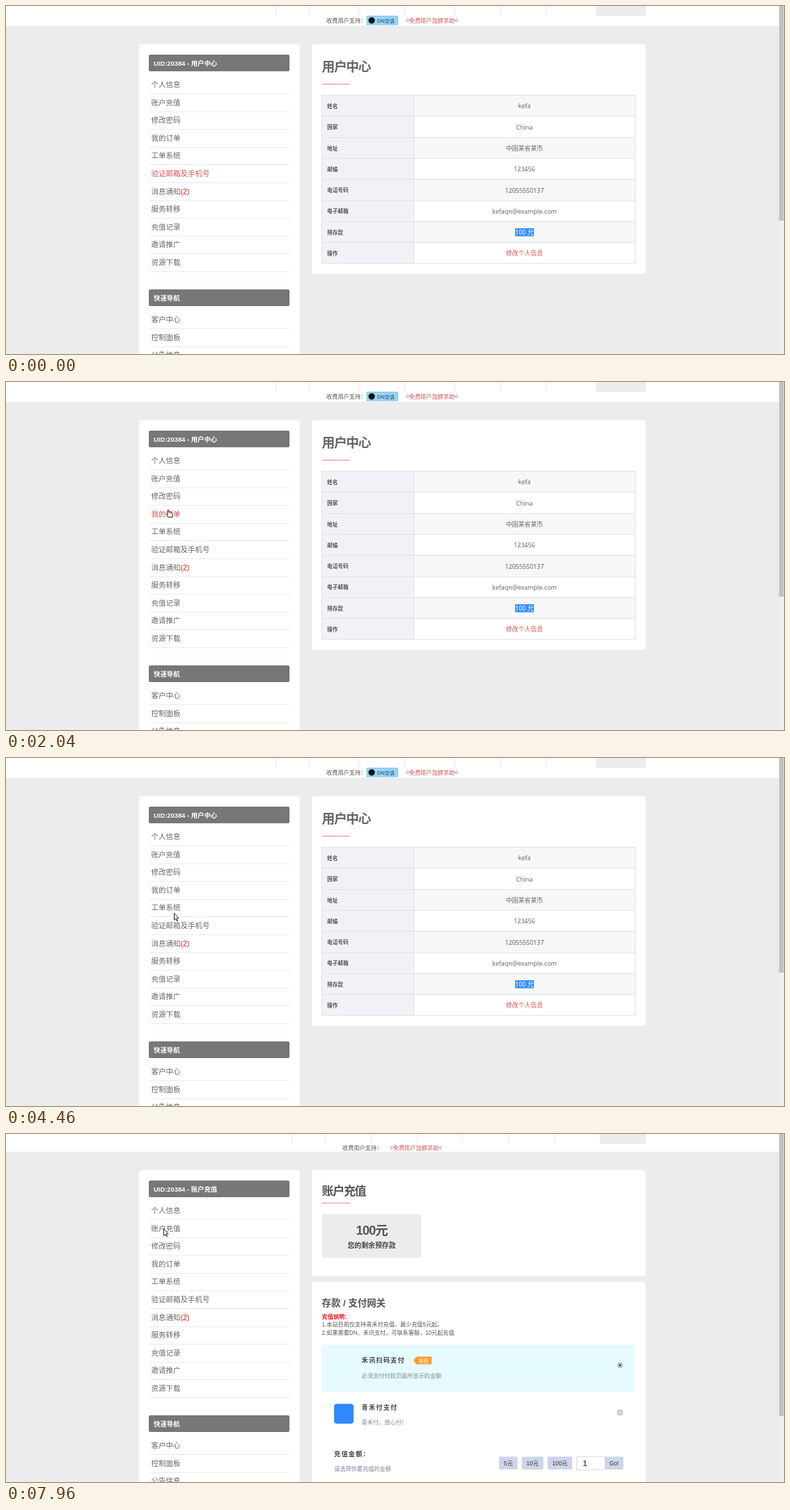
An HTML page with a canvas for the animation above (8 s loop, 1117x501 px).

```html
<!DOCTYPE html>
<html lang="zh-CN">
<head>
<meta charset="utf-8">
<title>用户中心</title>
<style>
html, body { margin: 0; width: 100%; height: 100%; overflow: hidden; background: #ececec; }
canvas { display: block; }
</style>
</head>
<body>
<canvas id="stage" width="1117" height="501"></canvas>
<script>
const ctx = document.getElementById('stage').getContext('2d');
const LOOP = 8000, SHOW = 50, CLICK = 6030, SWAP = 7960;
const ARIAL = '"Liberation Sans", "Noto Sans CJK SC", "Noto Sans CJK", sans-serif';
const HUMAN = '"Noto Sans", "Noto Sans CJK SC", "Noto Sans CJK", sans-serif';
const RED = '#d9534f', GREY = '#666', DARK = '#555', BG = '#ececec';

const MENU = ['个人信息', '账户充值', '修改密码', '我的订单', '工单系统', '验证邮箱及手机号',
  '消息通知', '服务转移', '充值记录', '邀请推广', '资源下载'];
const NAV = ['客户中心', '控制面板', '公告信息'];
const FIELDS = {
  姓名: 'kefa', 国家: 'China', 地址: '中国某省某市', 邮编: '123456',
  电话号码: '12055550137', 电子邮箱: 'kefaqn@example.com',
  预存款: '100 元', 操作: '修改个人信息'
};
const MENU_X = 208.5, MENU_Y = 113, STEP = 25.6, MENU_SIZE = 10.5;

// Pointer strokes: from, until, then the place reached
const START = [241, 240];
const STROKES = [
  [50, 250, 246, 277], [250, 740, 225, 203], [910, 1570, 232, 145], [1720, 2040, 233, 184],
  [2470, 2840, 570, 262], [2840, 3240, 250, 298], [3280, 4080, 242, 236],
  [4120, 4910, 239, 206], [4950, 5570, 224, 134], [5780, 6030, 226, 136]
];

function rect(x, y, w, h, color, r = 0) {
  ctx.fillStyle = color;
  ctx.beginPath();
  ctx.roundRect(x, y, w, h, r);
  ctx.fill();
}

function dot(x, y, r, color) {
  ctx.fillStyle = color;
  ctx.beginPath();
  ctx.arc(x, y, r, 0, Math.PI * 2);
  ctx.fill();
}

// Text placed by its vertical middle; returns its width
function text(str, x, mid, size, color = GREY, opt = {}) {
  ctx.font = `${opt.bold ? 'bold ' : ''}${size}px ${opt.font || ARIAL}`;
  ctx.letterSpacing = (opt.gap || 0) + 'px';
  ctx.textAlign = opt.align || 'left';
  ctx.fillStyle = color;
  ctx.fillText(str, x, mid + size * 0.38);
  return ctx.measureText(str).width;
}

function shape(points, fill, stroke) {
  ctx.beginPath();
  points.forEach(([x, y]) => ctx.lineTo(x, y));
  ctx.closePath();
  ctx.fillStyle = fill;
  ctx.fill();
  if (stroke) {
    ctx.strokeStyle = stroke;
    ctx.lineWidth = 0.9;
    ctx.stroke();
  }
}

function pointerAt(t) {
  let [x, y] = START;
  for (const [from, until, toX, toY] of STROKES) {
    const k = Math.min(1, Math.max(0, (t - from) / (until - from)));
    x += (toX - x) * k;
    y += (toY - y) * k;
  }
  return [x, y];
}

function hoveredRow(x, y) {
  return MENU.findIndex((s, i) => Math.abs(y - MENU_Y - i * STEP) < 6.5 &&
    x >= MENU_X && x <= MENU_X + s.length * MENU_SIZE);
}

function drawPointer(x, y, hand) {
  ctx.save();
  ctx.translate(Math.round(x), Math.round(y));
  ctx.lineJoin = 'round';
  const outline = hand
    ? [[-0.8, 0.5], [0.8, 0.5], [1.2, 3.6], [6, 4.8], [6, 10.6], [-0.2, 10.6], [-2.8, 6.2], [-0.8, 6.4]]
    : [[0.5, 0.5], [0.5, 10.3], [2.7, 8.3], [4.2, 11.8], [5.6, 11.2], [4.1, 7.8], [7, 7.6]];
  shape(outline, '#fff', '#111');
  ctx.restore();
}

// Tabs run leftwards from the right edge; the wide ones carry a caret
function drawHeader(bottom, wideTabs, badgeWidth) {
  rect(0, 0, 1110, bottom, '#fff');
  let x = 918.5;
  for (let i = 0; i < 8; i++) {
    const w = i === 7 ? 48 : 65.8 + (wideTabs.includes(i) ? 5.8 : 0);
    x -= w;
    if (i === 0) rect(x, 0, w, 14, BG);
    else rect(Math.round(x), 0, 1, 13, '#e6e6e6');
  }
  const half = (143 + badgeWidth) / 2, mid = bottom / 4 + 13.5;
  text('收费用户支持：', 554.5 - half, mid, 8.2, DARK);
  text('>免费用户加群求助<', 554.5 + half, mid, 8.2, RED, { align: 'right' });
}

function drawScrollbar(end) {
  rect(1110, 0, 7, 501, '#f1f1f1');
  rect(1110, 0, 6.5, end, '#c1c1c1');
}

function drawList(items, y, hover) {
  items.forEach((s, i) => {
    const mid = y + i * STEP;
    const w = text(s, MENU_X, mid, MENU_SIZE, i === hover ? RED : GREY);
    if (s === '消息通知') text('(2)', MENU_X + w, mid, MENU_SIZE, '#e01010');
    rect(205.5, Math.floor(mid + 13.4), 201.5, 1, '#ebebeb');
  });
}

function drawSidebar(title, dy, hover) {
  const bar = (s, y) => {
    rect(205, y, 202, 24, '#777', 2);
    text(s, 212, y + 12, 9.4, '#fff', { bold: true });
  };
  ctx.save();
  ctx.translate(0, dy);
  rect(191, 55, 230.5, 460, '#fff', 4);
  bar('UID:20384 - ' + title, 70);
  drawList(MENU, MENU_Y, hover);
  bar('快速导航', 408);
  drawList(NAV, 451, -1);
  ctx.restore();
}

function drawPanel(top, height) {
  rect(439, top, 479, height, '#fff', 4);
}

function drawTitle(s, mid, size, color, lineY) {
  text(s, 453.5, mid, size, color, { bold: true, gap: -1.3 });
  rect(453.5, lineY, 40.5, 1, '#e28a87');
}

function drawBadge() {
  rect(517.5, 14, 45.5, 13.5, '#74bde4', 1);
  rect(518.2, 14.7, 44.1, 12.1, '#9bd6f5', 1);
  dot(525, 20.8, 4.6, '#111');
  text('DN交谈', 533, 20.8, 7.3, '#123a5c');
}

function drawTable() {
  const left = 453, split = 585, right = 904, top = 128, h = 30.3, line = '#e2e2e2';
  const rows = Object.entries(FIELDS);
  rows.forEach(([label, value], i) => {
    const y = top + i * h, mid = y + 16;
    const picked = label === '预存款', link = label === '操作';
    rect(left, y, split - left, h, '#f0f2f7');
    rect(split, y, right - split, h, i % 2 ? '#fff' : '#f7f7f7');
    rect(left, Math.round(y), right - left, 1, line);
    text(label, 461, mid, 7.65, DARK, { bold: true });
    if (picked) rect(731, mid - 5.8, 27, 11.5, '#3390ff');
    text(value, 744.3, mid, 8.9, picked ? '#fff' : link ? RED : GREY, { font: HUMAN, align: 'center' });
  });
  const height = rows.length * h;
  rect(left, Math.round(top + height), right - left, 1, line);
  [left, split, right - 1].forEach(x => rect(x, top, 1, height, line));
}

function drawProfile(hover) {
  drawHeader(28.5, [0, 1, 4, 6], 46);
  drawBadge();
  drawSidebar('用户中心', 0, hover);
  drawPanel(55, 330.5);
  drawTitle('用户中心', 86.5, 18.7, GREY, 112);
  drawTable();
  drawScrollbar(309);
}

function drawOption(x, mid, title, note) {
  text(title, x, mid, 9.2, '#444', { bold: true, gap: 1.2 });
  text(note, x, mid + 21.8, 8.2, '#7d8896');
}

function drawRadio(y, on) {
  dot(881.7, y, 3.9, '#a0a0a0');
  dot(881.7, y, 3.1, '#dcdcdc');
  if (on) dot(881.7, y, 1.8, '#444');
}

// Draws a button sized by its label and returns its right edge
function drawButton(s, x) {
  ctx.font = `8.2px ${ARIAL}`;
  ctx.letterSpacing = '0px';
  const w = ctx.measureText(s).width + 13.7;
  rect(x, 464.5, w, 18.5, '#cdd6e8', 2);
  text(s, x + w / 2, 474, 8.2, '#333', { align: 'center' });
  return x + w;
}

function drawPayment() {
  drawHeader(25.5, [], 0);
  drawSidebar('账户充值', -3, -1);

  drawPanel(52, 153);
  drawTitle('账户充值', 82, 17, DARK, 99);
  rect(453.5, 115, 142.5, 63.5, BG, 4);
  text('100元', 525, 138, 18.4, DARK, { bold: true, gap: -1, align: 'center' });
  text('您的剩余预存款', 525, 160, 9.9, '#444', { bold: true, align: 'center' });

  drawPanel(213, 300);
  text('存款 / 支付网关', 453.5, 242.5, 13.4, DARK, { bold: true });
  text('充值说明：', 453.5, 262.5, 8.2, '#f01010', { bold: true });
  text('1.本站目前仅支持青禾付充值，最少充值5元起。', 453.5, 274, 8.15, DARK);
  text('2.如果需要DN、禾讯支付，可联系客服，10元起充值', 453.5, 285.7, 8.15, DARK);

  rect(453.5, 303.5, 449.5, 67.5, '#e6fbfd');
  drawOption(510.5, 326, '禾讯扫码支付', '必须支付付款页面所显示的金额');
  shape([[585, 326], [589, 320.5], [611, 320.5], [611, 331.5], [589, 331.5]], '#ff9a2e');
  text('推荐', 592.5, 326, 7.2, '#fff');
  drawRadio(333, true);

  rect(471, 388.5, 28, 28.5, '#2f88ff', 4);
  drawOption(510.5, 393.5, '青禾付支付', '青禾付，放心付！');
  drawRadio(401, false);

  drawOption(471, 460.5, '充值金额：', '请选择你要充值的金额');
  const inputX = ['5元', '10元', '100元'].reduce((x, s) => drawButton(s, x) + 6, 708);
  rect(inputX, 464, 42, 20, '#cbd0da', 2);
  rect(inputX + 0.8, 464.8, 40.4, 18.4, '#fff', 2);
  text('1', inputX + 9.5, 474, 10, '#444', { bold: true });
  drawButton('Go!', inputX + 40.5);
  drawScrollbar(406);
}

function frame(now) {
  const t = now % LOOP;
  const [x, y] = pointerAt(t);
  const hover = hoveredRow(x, y);
  rect(0, 0, 1117, 501, BG);
  if (t < SWAP) drawProfile(hover);
  else drawPayment();
  if (t >= SHOW) drawPointer(x, y, hover >= 0 && t < CLICK);
  requestAnimationFrame(frame);
}
requestAnimationFrame(frame);
</script>
</body>
</html>
```
